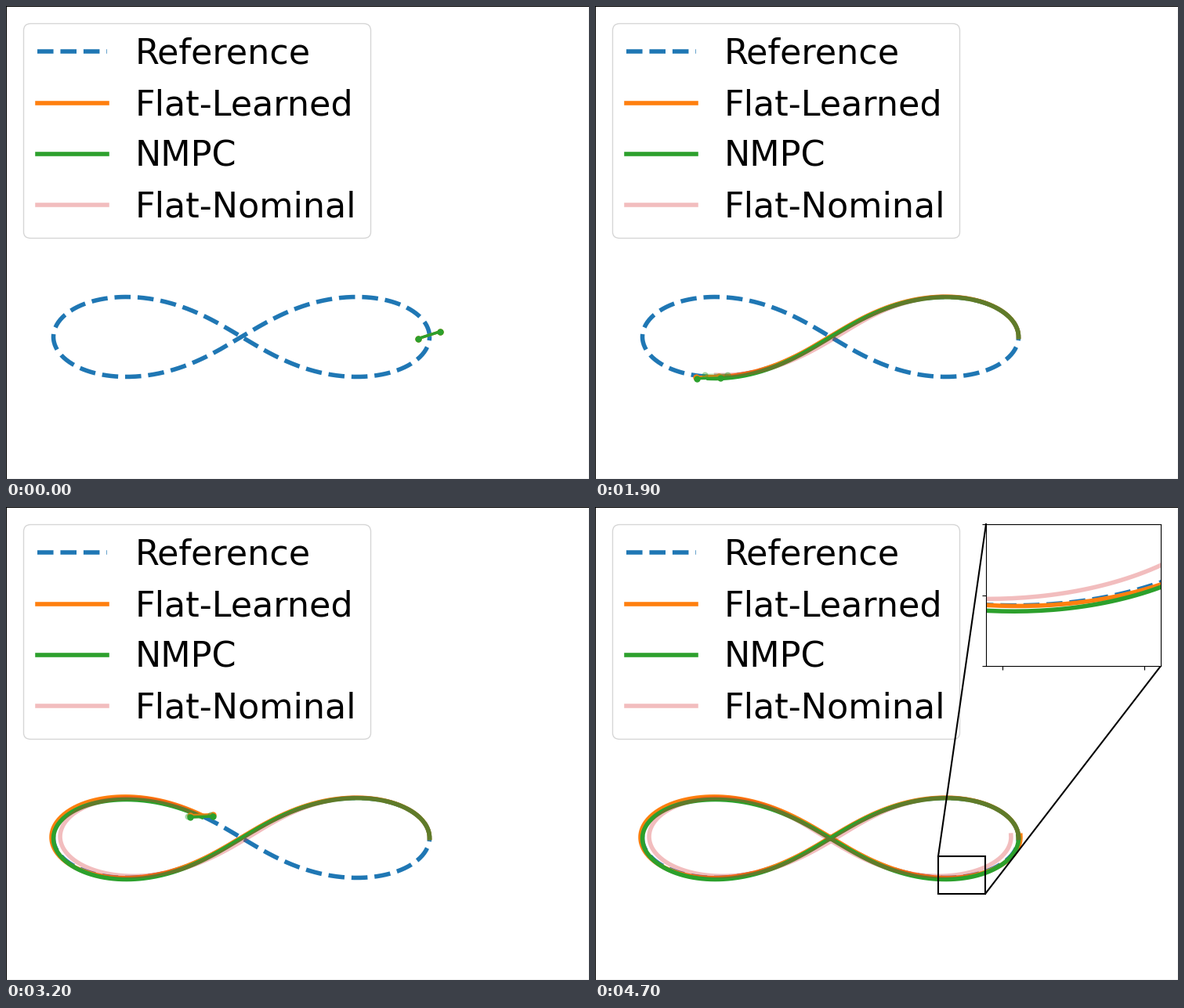
Write a matplotlib script that moves like this. It is 744 by 604 pixels and loops after 5700 ms.

```python
import numpy as np
import matplotlib.pyplot as plt
from matplotlib.animation import FuncAnimation
from matplotlib.lines import Line2D
from matplotlib.patches import Rectangle

W, H, DPI = 744, 604, 100
FRAMES, LAST = 57, 47          # the finished picture is held from LAST on
T_END = 6.3
CX, CY = 300.5, 422.5
AX, AY = 240, 144.25
LOBE = 51                      # height of a lobe above the centre line
ARM = 14.6
BOX = (438, 446, 498, 494)     # magnified area: left, top, right, bottom
VIEW = (499, 22, 722, 203)     # where it is shown

# line colour, drone colour, opacity
STYLES = {
    "Flat-Learned": ("tab:orange", "tab:orange", 1),
    "NMPC": ("tab:green", "tab:green", 1),
    "Flat-Nominal": ("tab:red", "tab:green", .3),
}


def lemniscate(t):
    s, c = np.sin(t), np.cos(t)
    return CX + AX * c / (1 + s * s), CY - AY * s * c / (1 + s * s)


def ramp(t, start, end):
    u = np.clip((t - start) / (end - start), 0, 1)
    return u * u * (3 - 2 * u)


def flown(name, t):
    """Reference position plus the controller's tracking error."""
    x, y = lemniscate(t)
    nx, ny = (x - CX) / AX, (y - CY) / LOBE
    if name == "Flat-Learned":
        grow = ramp(t, 0, 2)
        dx, dy = 2.5 * nx, .9 * ny - .7
    elif name == "NMPC":
        grow = ramp(t, .2, 2.5)
        dx, dy = 0, .8 + 1.2 * ny**2
    else:
        grow = ramp(t, .4, 1.8)
        dx, dy = 9.6 * np.tanh(1.5 * (4.1 - t)), -1 - 1.2 * ny
    return x + grow * dx, y + grow * dy


def tilt(t):
    """Roll angle that gives the sideways acceleration at t."""
    s, c = np.sin(t), np.cos(t)
    d = 2 - c * c
    acc = -c * (2 + c * c) / d**2 + s * s * c * (12 + 2 * c * c) / d**3
    return np.arctan(-.107 * acc)


def arm_ends(name, t):
    x, y = flown(name, t)
    ux, uy = ARM * np.cos(tilt(t)), -ARM * np.sin(tilt(t))
    return [x - ux, x + ux], [y - uy, y + uy]


def draw_reference(ax):
    ax.plot(*lemniscate(np.linspace(0, 2 * np.pi, 500)), "--",
            color="tab:blue", lw=4, label="Reference")


fig = plt.figure(figsize=(W / DPI, H / DPI), dpi=DPI, facecolor="white")
ax = fig.add_axes([0, 0, 1, 1])
ax.set(xlim=(0, W), ylim=(H, 0), xticks=[], yticks=[])
draw_reference(ax)

trails, drones = {}, {}
for name, (color, body, alpha) in STYLES.items():
    trails[name], = ax.plot([], [], color=color, lw=4, alpha=alpha, label=name)
for name, (color, body, alpha) in STYLES.items():
    drones[name], = ax.plot([], [], "o-", color=body, lw=2.5, ms=5,
                            alpha=alpha, zorder=2.5)
ax.legend(loc="upper left", fontsize=32)

# magnified detail
left, top, right, bottom = BOX
v_left, v_top, v_right, v_bottom = VIEW
zoom = fig.add_axes([v_left / W, 1 - v_bottom / H,
                     (v_right - v_left) / W, (v_bottom - v_top) / H])
zoom.set(xlim=(left, right), ylim=(bottom, top))
zoom.set_xticks([left + 5.7, left + 54.3], ["", ""])
zoom.set_yticks([top, (top + bottom) / 2, bottom], ["", "", ""])
draw_reference(zoom)
full = np.linspace(0, T_END, 600)
for name, (color, body, alpha) in STYLES.items():
    zoom.plot(*flown(name, full), color=color, lw=4, alpha=alpha)

edge = dict(ec="black", lw=1.5, zorder=6)
ray = dict(color="black", lw=1.5, zorder=6)
detail = [
    zoom,
    ax.add_patch(Rectangle((left, top), right - left, bottom - top,
                           fill=False, **edge)),
    ax.add_line(Line2D([left, v_left], [top, v_top], **ray)),
    ax.add_line(Line2D([right, v_right], [bottom, v_bottom], **ray)),
]


def update(k):
    done = k >= LAST
    t = T_END if done else .0167 + .1342 * k
    steps = np.linspace(0, t, 10 * k + 2)
    for name in STYLES:
        trails[name].set_data(*(flown(name, steps) if k else ([], [])))
        drones[name].set_data(*arm_ends(name, t))
        drones[name].set_visible(not done)
    for part in detail:
        part.set_visible(done)
    return [*trails.values(), *drones.values(), *detail]


anim = FuncAnimation(fig, update, frames=FRAMES, interval=100,
                     init_func=lambda: update(0), repeat=True, repeat_delay=0)
plt.show()
```
